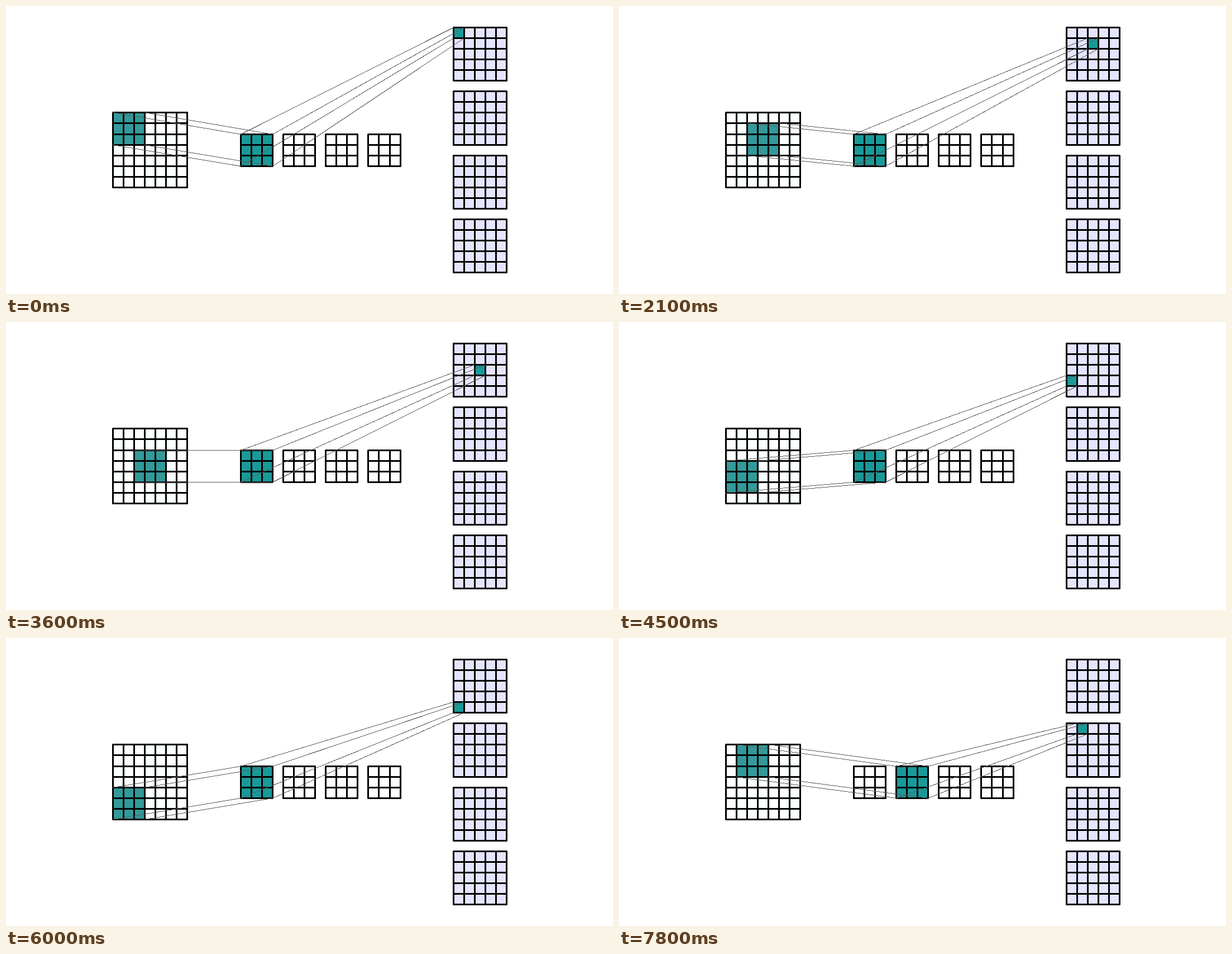
An HTML page for the animation above (8 s loop, 1087 by 515 pixels).

```html
<!DOCTYPE html>
<html lang="en">
<head>
<meta charset="utf-8">
<title>Convolution with four kernels</title>
<style>
  html, body { margin: 0; width: 100%; height: 100%; overflow: hidden; background: #fff; }
  svg { display: block; width: 100%; height: 100%; }
  .grid { fill: none; stroke: #000; stroke-width: 3; stroke-linecap: round; }
  .rays { fill: none; stroke: #5c5c5c; stroke-width: 1; shape-rendering: crispEdges; }
</style>
</head>
<body>
<svg id="stage" viewBox="0 0 1087 515"></svg>
<script>
const LOOP = 8000, STEP = 300;
const UNIT = 19.07, LEFT = 191.2, TOP = 38.3;
const KERNEL = 3, OUTPUT = 5;
const stage = document.getElementById('stage');

// Everything sits on one lattice; lines are centred on whole pixels.
const px = col => Math.floor(LEFT + col * UNIT) + 0.5;
const py = row => Math.floor(TOP + row * UNIT) + 0.5;

function add(tag, attrs) {
  const node = document.createElementNS('http://www.w3.org/2000/svg', tag);
  set(node, attrs);
  stage.append(node);
  return node;
}

function set(node, attrs) {
  for (const key in attrs) node.setAttribute(key, attrs[key]);
}

function place(node, { col, row, size }) {
  set(node, {
    x: px(col), y: py(row),
    width: px(col + size) - px(col), height: py(row + size) - py(row)
  });
}

function drawGrid({ col, row, size }) {
  let d = '';
  for (let i = 0; i <= size; i++) {
    d += `M${px(col)} ${py(row + i)}H${px(col + size)}`;
    d += `M${px(col + i)} ${py(row)}V${py(row + size)}`;
  }
  add('path', { class: 'grid', d });
}

const corners = ({ col, row, size }) =>
  [[0, 0], [size, 0], [0, size], [size, size]].map(([x, y]) => `${px(col + x)} ${py(row + y)}`);

function connect(from, to) {
  const ends = corners(to);
  return corners(from).map((start, i) => `M${start}L${ends[i]}`).join('');
}

const input = { col: 0, row: 8, size: 7 };
const kernels = [0, 1, 2, 3].map(i => ({ col: 12 + 4 * i, row: 10, size: KERNEL }));
const outputs = [0, 1, 2, 3].map(i => ({ col: 32, row: 6 * i, size: OUTPUT }));

const fillBox = (box, fill) => place(add('rect', { fill }), box);
fillBox(input, '#fbfffe');
kernels.forEach(box => fillBox(box, '#fdfffe'));
outputs.forEach(box => fillBox(box, '#e5e5ff'));

const patchMark = add('rect', { fill: '#339999' });
const kernelMark = add('rect', { fill: '#1a9999' });
const cellMark = add('rect', { fill: '#1a9999' });

[input, ...kernels, ...outputs].forEach(drawGrid);
const rays = add('path', { class: 'rays' });

function render(time) {
  const step = Math.floor((time % LOOP) / STEP);
  const index = Math.floor(step / OUTPUT ** 2);
  const col = step % OUTPUT;
  const row = Math.floor(step / OUTPUT) % OUTPUT;

  const kernel = kernels[index];
  const patch = { col: input.col + col, row: input.row + row, size: KERNEL };
  const cell = { col: outputs[index].col + col, row: outputs[index].row + row, size: 1 };

  place(patchMark, patch);
  place(kernelMark, kernel);
  place(cellMark, cell);
  rays.setAttribute('d', connect(patch, kernel) + connect(kernel, cell));
}

const start = performance.now();
function tick() {
  render(performance.now() - start);
  requestAnimationFrame(tick);
}
tick();
</script>
</body>
</html>
```
